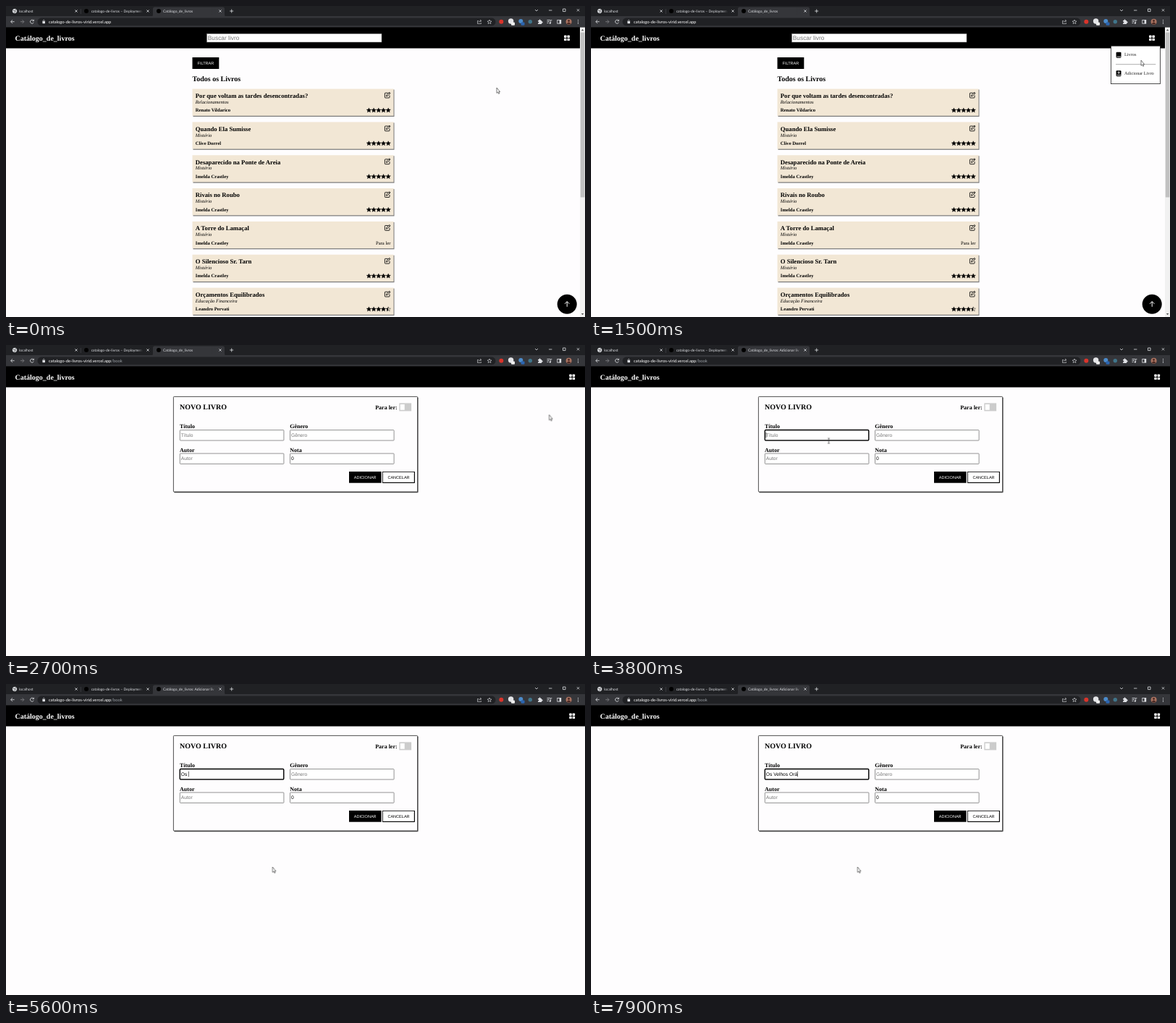
Animation of 800 by 430 pixels, one loop 8000 ms. Source, as an HTML page:

```html
<!DOCTYPE html>
<html lang="pt-BR">
<head>
<meta charset="utf-8">
<title>Catálogo_de_livros</title>
<style>
html, body { margin: 0; width: 100%; height: 100%; overflow: hidden; background: #fefdfe; }
svg { display: block; width: 800px; height: 430px; }
text { font-family: "Liberation Serif", Tinos, serif; text-rendering: geometricPrecision; white-space: pre; }
.ui { font: 5px Lato, sans-serif; fill: #dfe1e5; }
.url { font-size: 5.83px; fill: #fff; }
.sans { font: 6.667px "Liberation Sans", Arimo, sans-serif; }
.btn { font-size: 5.556px; text-anchor: middle; }
.hint { fill: #757575; }
.h { font-size: 10px; font-weight: bold; }
.title { font-size: 8.667px; font-weight: bold; }
.label { font-size: 8px; font-weight: bold; }
.small { font-size: 6.667px; }
.bold { font-weight: bold; }
.italic { font-style: italic; }
.end { text-anchor: end; }
.item { font-size: 6.3px; fill: #222; }
.line { fill: none; stroke: #dfe1e5; stroke-width: .8; }
.box { fill: #fff; stroke: #777; stroke-width: .8; }

/* every track starts slightly ahead so cuts land on the 100 ms grid */
.anim { animation: 8s step-end -20ms infinite; }
.list { animation-name: list; }
.form { animation-name: form; }
.menu { animation-name: menu; }
.add { animation-name: add; }
.short { animation-name: short; }
.long { animation-name: long; }
.focus { animation-name: focus; }
.arrow { animation-name: arrow; }
.beam { animation-name: beam; }
.mouse { animation-name: mouse; }
@keyframes list { 0% { opacity: 1 } 33.75%, 100% { opacity: 0 } }
@keyframes form { 0% { opacity: 0 } 33.75%, 100% { opacity: 1 } }
@keyframes menu { 0% { opacity: 0 } 13.75% { opacity: 1 } 33.75%, 100% { opacity: 0 } }
@keyframes add { 0% { opacity: 1 } 25% { opacity: .62 } 33.75%, 100% { opacity: 1 } }
@keyframes short { 0% { opacity: 1 } 36.25%, 100% { opacity: 0 } }
@keyframes long { 0% { opacity: 0 } 36.25%, 100% { opacity: 1 } }
@keyframes focus { 0% { opacity: 0 } 47.5%, 100% { opacity: 1 } }
@keyframes arrow { 0% { opacity: 1 } 46.25% { opacity: 0 } 48.75%, 100% { opacity: 1 } }
@keyframes beam { 0% { opacity: 0 } 46.25% { opacity: 1 } 48.75%, 100% { opacity: 0 } }
@keyframes mouse {
  0% { transform: translate(678px, 113px); animation-timing-function: steps(9) }
  11.25% { transform: translate(773px, 41px) }
  13.75% { transform: translate(773px, 41px); animation-timing-function: steps(4) }
  18.75% { transform: translate(760px, 75px); animation-timing-function: steps(6) }
  26.25% { transform: translate(752px, 94px); animation-timing-function: steps(5) }
  32.5% { transform: translate(750.5px, 96.5px) }
  35% { transform: translate(750.5px, 96.5px); animation-timing-function: steps(8) }
  45% { transform: translate(407px, 86px) }
  46.25% { transform: translate(366px, 114px) }
  47.5% { transform: translate(328.5px, 132.5px); animation-timing-function: steps(3) }
  51.25% { transform: translate(350px, 198px) }
  52.5% { transform: translate(350px, 198px); animation-timing-function: steps(3) }
  56.25%, 100% { transform: translate(368.3px, 253px) }
}
</style>
</head>
<body>
<svg viewBox="0 0 800 430">
  <defs>
    <linearGradient id="fadeTab"><stop stop-color="#202124" stop-opacity="0"/><stop offset="1" stop-color="#202124"/></linearGradient>
    <linearGradient id="fadeActive"><stop stop-color="#35363a" stop-opacity="0"/><stop offset="1" stop-color="#35363a"/></linearGradient>
    <filter id="soft" x="-5%" y="-10%" width="110%" height="125%"><feGaussianBlur stdDeviation=".6"/></filter>
    <polygon id="star" points="0,-3.2 .95,-1.1 3.2,-.9 1.5,.6 2,2.8 0,1.65 -2,2.8 -1.5,.6 -3.2,-.9 -.95,-1.1" stroke="#000" stroke-width=".4" stroke-linejoin="round"/>
    <g id="half">
      <use href="#star" fill="none"/>
      <polygon points="0,-3.2 0,1.65 -2,2.8 -1.5,.6 -3.2,-.9 -.95,-1.1"/>
    </g>
    <g id="edit" fill="none" stroke="#000" stroke-width=".85" stroke-linejoin="round">
      <path d="M1-3H-2.6Q-3.4-3-3.4-2.2V3Q-3.4 3.8-2.6 3.8H2.4Q3.2 3.8 3.2 3V.3"/>
      <path d="M-1.3 1.7-.8-.3 2.9-4 4.2-2.7.5 1ZM2-3.1 3.3-1.8"/>
    </g>
    <path id="cross" class="line" d="M-1.6-1.6 1.6 1.6M1.6-1.6-1.6 1.6"/>
    <g id="grid" fill="#fff">
      <rect x="-3.9" y="-3.7" width="3.4" height="3.4" rx=".7"/><rect x=".5" y="-3.7" width="3.4" height="3.4" rx=".7"/>
      <rect x="-3.9" y=".5" width="3.4" height="3.4" rx=".7"/><rect x=".5" y=".5" width="3.4" height="3.4" rx=".7"/>
    </g>
    <g id="book">
      <rect x="-3.4" y="-4" width="6.9" height="8" rx="1.1"/>
      <path d="M-2.5 2.4H3.4" stroke="#fff" stroke-width=".8"/>
    </g>
  </defs>

  <rect width="800" height="430" fill="#fefdfe"/>

  <!-- browser -->
  <rect width="800" height="30" fill="#202124"/>
  <path d="M201 14.5Q203 14.5 203 12V4Q203 1.5 205.5 1.5H299.5Q302 1.5 302 4V12Q302 14.5 304 14.5Z" fill="#35363a"/>
  <rect y="14" width="800" height="15.5" fill="#35363a"/>
  <path d="M103.3 4V11" stroke="#55565a" stroke-width=".5"/>
  <g class="line" stroke-width=".5"><circle cx="12" cy="7" r="2.8" fill="#dfe1e5"/><path d="M9.7 6Q12 8 14 5M11 9.5Q12 7 14 8" stroke="#444"/></g>
  <circle cx="111" cy="7" r="3"/>
  <circle cx="211" cy="7" r="3"/>
  <text class="ui" x="18" y="8.8">localhost</text>
  <text class="ui" x="117.7" y="8.8">catalogo-de-livros – Deploymen</text>
  <rect x="182" y="2" width="8" height="10" fill="url(#fadeTab)"/>
  <text class="ui anim short" x="217" y="8.8">Catálogo_de_livros</text>
  <text class="ui anim long" x="217" y="8.8">Catálogo_de_livros: Adicionar liv</text>
  <rect x="283" y="2" width="7" height="10" fill="url(#fadeActive)"/>
  <rect x="290" y="2" width="11" height="10" fill="#35363a"/>
  <use href="#cross" x="97" y="7"/><use href="#cross" x="196" y="7"/><use href="#cross" x="296" y="7"/>
  <path class="line" d="M309.2 7H314.2M311.7 4.5V9.5"/>
  <path class="line" d="M731 5 733 7 735 5M750 6H754.4M769.5 4H773V7.6H769.5Z"/>
  <use href="#cross" x="790.5" y="5.8"/>

  <rect x="43.5" y="16.6" width="633" height="10.6" rx="5.3" fill="#202124"/>
  <path class="line" d="M11.6 21.7H6.7M9 19.3 6.6 21.7 9 24.1"/>
  <path class="line" style="stroke:#85868a" d="M20 21.7H24.8M22.5 19.3 24.9 21.7 22.5 24.1"/>
  <path class="line" d="M38 20.2A2.5 2.5 0 1 0 38.3 22.7M38.4 18.8V20.7H36.4"/>
  <rect x="50.4" y="21" width="3.6" height="3.2" rx=".4" fill="#dfe1e5"/>
  <path class="line" style="stroke-width:.6" d="M51.1 21V20Q52.2 18.2 53.3 20V21"/>
  <text class="ui url" x="59" y="23.8">catalogo-de-livros-virid.vercel.app<tspan class="anim form" id="path" fill="#9aa0a6"></tspan></text>
  <path class="line" style="stroke-width:.6" d="M653 20.5H651.5V24.5H656.5V23.2M653 22.8Q653.2 20.8 656 20.6M655 19 657 20.6 655 22.2"/>
  <path class="line" style="stroke-width:.6" d="M668 19 668.8 21 671 21.1 669.3 22.5 669.9 24.6 668 23.4 666.1 24.6 666.7 22.5 665 21.1 667.2 21Z"/>
  <circle cx="684.3" cy="21.8" r="3" fill="#d9342b"/>
  <circle cx="697.6" cy="21" r="3.7" fill="#e4e5e8"/><rect x="698" y="22.4" width="5" height="4.4" rx="1" fill="#eee"/>
  <circle cx="711.3" cy="21" r="3" fill="#4c8ccc"/><rect x="711.5" y="22.4" width="5" height="4.4" rx="1" fill="#2b65b0"/>
  <circle cx="724.3" cy="21.8" r="2.7" fill="#40758a"/>
  <path d="M735 20H736.5A1.1 1.1 0 1 1 738.5 20H740V21.5A1.1 1.1 0 1 1 740 23.5V25H735V23.4A1 1 0 1 0 735 21.5Z" fill="#dfe1e5"/>
  <path class="line" d="M747.5 19.5H752M747.5 21.5H751M747.5 23.5H749.5M752.6 23.6V19.6H754.4"/><circle cx="751.8" cy="23.7" r="1.1" fill="#dfe1e5"/>
  <rect class="line" x="761.8" y="19.4" width="5" height="4.8"/><rect x="764.6" y="19.4" width="2.4" height="4.8" fill="#dfe1e5"/>
  <circle cx="777.6" cy="21.7" r="4" fill="#a87260"/>
  <circle cx="777.6" cy="20.5" r="1.4" fill="#4b2a24"/><path d="M774.8 24.5Q777.6 20.5 780.4 24.5Q777.6 26.7 774.8 24.5Z" fill="#4b2a24"/>
  <g fill="#dfe1e5"><circle cx="790.5" cy="19.6" r=".65"/><circle cx="790.5" cy="21.8" r=".65"/><circle cx="790.5" cy="24" r=".65"/></g>

  <!-- header -->
  <rect y="29.5" width="800" height="29" fill="#000"/>
  <text class="h" x="12.5" y="47.5" fill="#fff">Catálogo_de_livros</text>

  <g class="anim list">
    <use href="#grid" x="775" y="44.2"/>
    <rect x="277.5" y="38.3" width="241.5" height="11.7" fill="#fff" stroke="#777" stroke-width=".5"/>
    <text class="sans hint" style="font-size:8.333px" x="278.8" y="47.1">Buscar livro</text>
    <rect x="257.5" y="71" width="36.8" height="16" fill="#000"/>
    <text class="sans btn" x="275.9" y="81" fill="#fff">FILTRAR</text>
    <text class="h" x="257.5" y="103.8">Todos os Livros</text>
    <g id="cards"></g>
    <circle cx="775.2" cy="412.2" r="13.5"/>
    <path d="M775.2 415.8V408.8M772 411.8 775.2 408.6 778.4 411.8" fill="none" stroke="#fff" stroke-width="1"/>
    <rect x="793" y="29.5" width="7" height="401" fill="#f1f1f1"/>
    <rect x="793.8" y="36.5" width="5.6" height="228" fill="#c1c1c1"/>
    <path d="M794.8 34.2 796.6 32 798.4 34.2ZM794.8 425 796.6 427.2 798.4 425Z" fill="#555"/>
  </g>

  <g class="anim menu">
    <rect x="718.6" y="55.2" width="67.8" height="52.4" fill="#fff" stroke="#222" stroke-width=".8"/>
    <use href="#book" x="729" y="67.7"/>
    <text class="item" x="737" y="69.4">Livros</text>
    <path d="M725 80.7H780.3" stroke="#999" stroke-width=".8"/>
    <g class="anim add">
      <use href="#book" x="729" y="93.2"/>
      <path d="M729.2 90.3V94M727.4 92.1H731" stroke="#fff" stroke-width=".8"/>
      <text class="item" x="737" y="95">Adicionar Livro</text>
    </g>
  </g>

  <g class="anim form">
    <use href="#grid" x="782.2" y="44.2"/>
    <rect x="232.2" y="72.2" width="337.4" height="132" rx="1" fill="#555" filter="url(#soft)"/>
    <rect x="231.4" y="71.4" width="337.2" height="131.6" rx="1" fill="#fefdfe" stroke="#222" stroke-width=".8"/>
    <text class="h" x="240" y="89">NOVO LIVRO</text>
    <text class="label" x="510.2" y="88.6">Para ler:</text>
    <rect x="543.3" y="80.4" width="16.8" height="11" fill="#ccc"/>
    <rect x="544.7" y="82" width="6" height="7.8" fill="#fff"/>
    <g id="fields"></g>
    <rect class="anim focus" x="240.3" y="117.5" width="143.4" height="14.4" rx="1.2" fill="none" stroke="#000" stroke-width="1.3"/>
    <text class="sans" id="typed" x="241.8" y="127"></text>
    <path id="caret" d="M0 120.8V128.3" stroke="#000" stroke-width=".6"/>
    <rect x="474" y="175" width="44.6" height="15.7" fill="#000"/>
    <text class="sans btn" x="496.2" y="184.9" fill="#fff">ADICIONAR</text>
    <rect x="520.6" y="175.4" width="43.8" height="15" fill="#fff" stroke="#000" stroke-width=".8"/>
    <path d="M520.5 190.3H564.3V175.4" fill="none" stroke="#000"/>
    <text class="sans btn" x="542.5" y="184.9">CANCELAR</text>
  </g>

  <g class="anim mouse">
    <path class="anim arrow" d="M0 0V7.4L1.6 6 2.7 8.4 3.8 7.9 2.8 5.6H4.6Z" fill="#fff" stroke="#222" stroke-width=".6" stroke-linejoin="round"/>
    <path class="anim beam" d="M-1.4-3.4H1.4M0-3.4V3.4M-1.4 3.4H1.4" fill="none" stroke="#333" stroke-width=".7"/>
  </g>
</svg>
<script>
const $ = id => document.getElementById(id);

// title, genre, author, rating (0 = still to read)
const books = [
  ['Por que voltam as tardes desencontradas?', 'Relacionamentos', 'Renato Vildarico', 5],
  ['Quando Ela Sumisse', 'Mistério', 'Clive Dorrel', 5],
  ['Desaparecido na Ponte de Areia', 'Mistério', 'Imelda Crastley', 5],
  ['Rivais no Roubo', 'Mistério', 'Imelda Crastley', 5],
  ['A Torre do Lamaçal', 'Mistério', 'Imelda Crastley', 0],
  ['O Silencioso Sr. Tarn', 'Mistério', 'Imelda Crastley', 5],
  ['Orçamentos Equilibrados', 'Educação Financeira', 'Leandro Pervati', 4.5]
];

const rating = n => n
  ? [0, 1, 2, 3, 4].map(i => `<use href="#${n > i + .5 ? 'star' : 'half'}" x="${501.4 + i * 6.7}" y="29.5"/>`).join('')
  : '<text class="small end" x="531.5" y="31.6">Para ler</text>';

const card = ([title, genre, author, n], i) => `
  <g transform="translate(0 ${114.6 + i * 45.83})">
    <rect x="258.5" y="1" width="278" height="37.4" fill="#777" filter="url(#soft)"/>
    <rect x="257.5" width="278" height="37.2" fill="#f2e7d5"/>
    <text class="title" x="261.8" y="12.3">${title}</text>
    <text class="small italic" x="261.8" y="20.2">${genre}</text>
    <text class="small bold" x="261.8" y="31.6">${author}</text>
    <use href="#edit" x="526.8" y="8.6"/>
    ${rating(n)}
  </g>`;

const field = (name, x, y, value) => `
  <text class="label" x="${x}" y="${y - 2}">${name}</text>
  <rect class="box" x="${x + .3}" y="${y + .4}" width="143.6" height="14.4" rx=".8"/>
  <text class="sans ${value ? '' : 'hint'}" x="${x + 1.8}" y="${y + 9.8}" id="${name}">${value || name}</text>`;

$('cards').innerHTML = books.map(card).join('');
$('fields').innerHTML = field('Título', 240, 117.2) + field('Gênero', 392.2, 117.2)
  + field('Autor', 240, 149.6) + field('Nota', 392.2, 149.6, '0');
$('path').textContent = '/book';

const phrase = 'Os Velhos Orá';
const keys = [5000, 5400, 5600, 6100, 6300, 6400, 6600, 6900, 7000, 7200, 7600, 7800, 7900];
const pen = document.createElement('canvas').getContext('2d');
pen.font = '100px "Liberation Sans", Arimo, sans-serif';

let start;
function frame(now) {
  start ??= now;
  const t = (now - start + 20) % 8000;
  const text = phrase.slice(0, keys.filter(k => k <= t).length);
  $('typed').textContent = text;
  $('Título').style.opacity = text ? 0 : 1;
  const x = 242 + pen.measureText(text).width * .06667;
  $('caret').setAttribute('transform', `translate(${x} 0)`);
  $('caret').style.opacity = text || (t >= 3800 && t < 4300) ? 1 : 0;
  requestAnimationFrame(frame);
}
requestAnimationFrame(frame);
</script>
</body>
</html>
```
